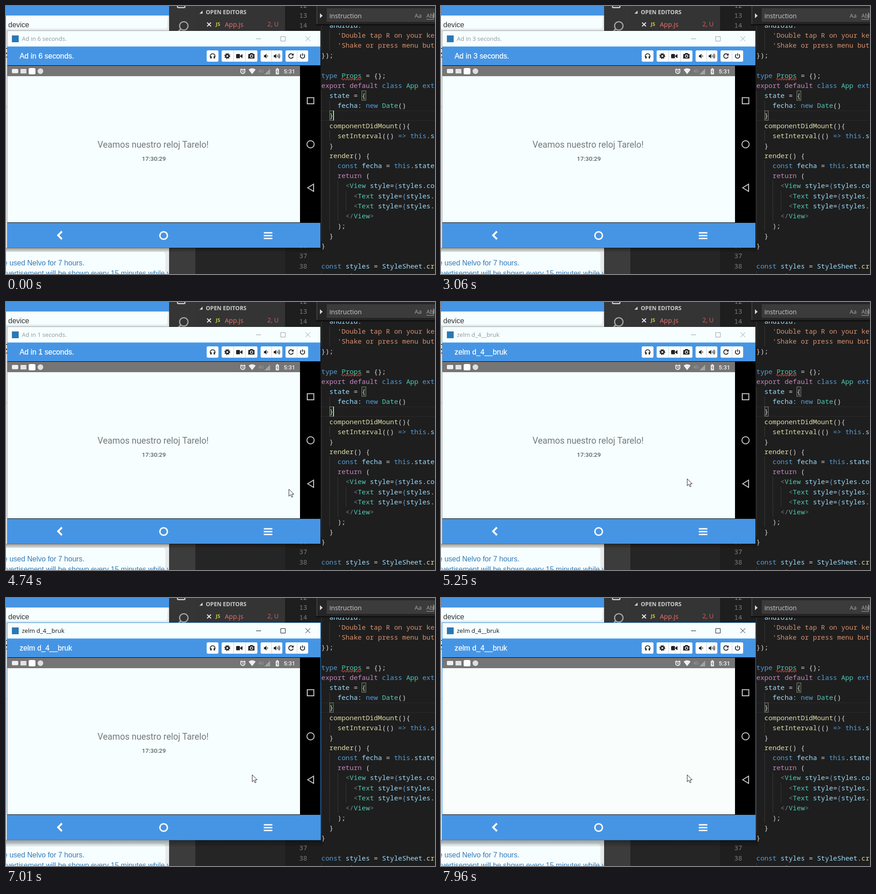
These frames come from a looping animation (947 by 592 pixels, 8000 ms). An HTML page:

```html
<!DOCTYPE html>
<html lang="es">
<head>
<meta charset="utf-8">
<style>
  html, body { margin: 0; width: 100%; height: 100%; overflow: hidden; background: #1e1e1e; }
  svg { display: block; width: 947px; height: 592px; }
  text { white-space: pre; }
  .mono { font: 500 14.88px "Noto Sans Mono", monospace; }
  .ui { font-family: "Open Sans", sans-serif; }
  .web { font: 16px "Liberation Sans", Arial, sans-serif; }
  .droid { font-family: Roboto, sans-serif; }
  #heading { font-size: 16.3px; stroke: #fff; stroke-width: .3px; }
</style>
</head>
<body>
<svg id="stage" viewBox="0 0 947 592" xmlns="http://www.w3.org/2000/svg"></svg>
<script>
const LOOP = 8000;
const BLUE = '#4695e4', PAPER = '#f6feff';
const DEVICE = 'zelm d_4__bruk';

// ---- markup helpers ----
const rect = (x, y, w, h, fill, more = '') =>
  `<rect x="${x}" y="${y}" width="${w}" height="${h}" fill="${fill}" ${more}/>`;
const text = (cls, x, y, str, fill, more = '') =>
  `<text class="${cls}" x="${x}" y="${y}" fill="${fill}" ${more}>${str}</text>`;
const line = (d, stroke, w = 1, more = '') =>
  `<path d="${d}" fill="none" stroke="${stroke}" stroke-width="${w}" ${more}/>`;
const shape = (d, fill, more = '') => `<path d="${d}" fill="${fill}" ${more}/>`;
const disc = (x, y, r, fill, more = '') => `<circle cx="${x}" cy="${y}" r="${r}" fill="${fill}" ${more}/>`;
const esc = s => s.replace(/&/g, '&amp;').replace(/</g, '&lt;').replace(/>/g, '&gt;');

// ---- code editor ----
const COL = 8.93, ROW = 22.15, LEFT = 696;
const baseline = n => 48 + (n - 14) * ROW;
const INK = { k: '#569cd6', p: '#c586c0', t: '#4ec9b0', v: '#9cdcfe', f: '#dcdcaa', s: '#d6906f', w: '#d4d4d4', g: '#808080' };

// Each row: indent, then runs marked ^ plus an ink letter
const code = {
  14: [1, '^vandroid:'],
  15: [2, "^s'Double tap R on your keyboard"],
  16: [2, "^s'Shake or press menu button"],
  17: [0, '^w});'],
  19: [0, '^ktype ^tProps^w = {};'],
  20: [0, '^pexport default ^kclass ^tApp ^kextends'],
  21: [1, '^vstate^w = {'],
  22: [2, '^vfecha: ^knew ^tDate^w()'],
  23: [1, '^w}'],
  24: [1, '^fcomponentDidMount^w(){'],
  25: [2, '^fsetInterval^w(() ^k=> this^w.^vsetState'],
  26: [1, '^w}'],
  27: [1, '^frender^w() {'],
  28: [2, '^kconst ^vfecha^w = ^kthis^w.^vstate'],
  29: [2, '^preturn^w ('],
  30: [3, '^g<^tView ^vstyle^w=^k{^vstyles^w.^vcontainer'],
  31: [4, '^g<^tText ^vstyle^w=^k{^vstyles^w.'],
  32: [4, '^g<^tText ^vstyle^w=^k{^vstyles^w.'],
  33: [3, '^g</^tView^g>'],
  34: [2, '^w);'],
  35: [1, '^w}'],
  36: [0, '^w}'],
  38: [0, '^kconst ^vstyles^w = ^vStyleSheet^w.^fcreate'],
  39: [1, '^vcontainer:^w {'],
};

function codeRow(n, [indent, src]) {
  const runs = src.split('^').slice(1)
    .map(r => `<tspan fill="${INK[r[0]]}">${esc(r.slice(1))}</tspan>`).join('');
  let out = '';
  for (let i = 0; i < indent; i++) {
    const x = Math.round(LEFT + i * 2 * COL) + .5, y = baseline(n) - 16.5;
    out += line(`M${x} ${y}v${ROW}`, '#3a3a3a');
  }
  return out + text('mono', LEFT + indent * 2 * COL, baseline(n), runs, '#d4d4d4');
}

function wave(x, y, n) {
  let d = `M${x} ${y}`;
  for (let i = 0; i < n; i++) d += `q1.5 ${i % 2 ? 3.4 : -3.4} 3 0`;
  return line(d, '#e4473f', 1.2);
}

function editor() {
  let out = rect(616, 0, 331, 592, '#1e1e1e');
  out += line('M690 231.5H947M690 252.5H947', '#2b2b2b');
  out += rect(785.5, 187.5, 9, 21, '#1f2a1f', 'stroke="#888"') + rect(714.5, 231.5, 8, 21, '#1f2a1f', 'stroke="#888"');
  for (const n in code) out += codeRow(+n, code[n]);
  out += wave(740, 162, 15);
  for (const n of [12, 13, 14, 36, 37, 38, 39])
    out += text('mono', 665, baseline(n), n, '#7c7c7c', 'text-anchor="end"');
  return out + rect(722, 231, 2, 22, '#c8c8c6', 'id="caret"');
}

function findBox() {
  return rect(684, 38, 263, 5, '#101010') + rect(685, 0, 262, 40, '#252526') + rect(685, 0, 2.5, 40, '#3a3a3a')
    + shape('M693 16l6 5.5l-6 5.5z', '#d8d8d8')
    + rect(708, 5, 239, 30, '#3b3b3b')
    + text('ui', 714, 27, 'instruction', '#cfcfcf', 'font-size="14.2"')
    + text('ui', 902, 26, 'Aa', '#a8a8a8', 'font-size="13"')
    + text('ui', 928, 26, 'Abl', '#a8a8a8', 'font-size="12.5"')
    + line('M928 29.5H944M943.5 14V30', '#a8a8a8');
}

function sideBars() {
  return rect(360, 0, 58, 592, '#353535') + rect(360, 534, 58, 58, '#3c3c3c')
    + rect(418, 0, 198, 592, '#252526') + rect(418, 0, 198, 55, '#343435')
    + line('M378.5 -4V1.5q0 2 2 2H393q2 0 2 -2V-4', '#d6d6d6', 2.4)
    + line('M386 50.5L380.5 56', '#a5a5a5', 3.2) + disc(392.5, 44, 9.3, 'none', 'stroke="#a5a5a5" stroke-width="2.6"')
    + shape('M434 10v7h-7z', '#d0d0d0')
    + text('ui', 441, 18, 'OPEN EDITORS', '#cccccc', 'font-size="12.4" font-weight="700"')
    + line('M444 36.5l8.5 8.5M452.5 36.5l-8.5 8.5', '#ededed', 2)
    + text('ui', 463, 44, 'JS', '#cbcb41', 'font-size="11" font-weight="700"')
    + text('ui', 483, 46, 'App.js', '#f0706a', 'font-size="14.4"')
    + text('ui', 577, 45, '2, U', '#d0625c', 'font-size="13.8"');
}

function webPage() {
  return rect(0, 0, 360, 592, '#e6eaeb') + rect(0, 0, 360, 21, BLUE)
    + rect(-10, 21, 366, 29, PAPER, 'rx="5"') + rect(0, 21, 357, 10, PAPER)
    + text('web', 5, 47, 'device', '#333')
    + line('M0 222.5h3', '#b5b5b5') + rect(0, 93, 3, 1.5, '#333') + rect(0, 103, 2, 3, '#333') + rect(0, 112, 3, 1.5, '#333')
    + rect(-10, 543, 362, 70, PAPER, 'rx="6"')
    + text('web', -5.7, 573, 'e used Nelvo for 7 hours.', '#337ab7')
    + `<g clip-path="url(#page)">${text('web', 1, 596, 'vertisement will be shown every 15 minutes while you', '#337ab7')}</g>`;
}

// ---- phone mirror window ----
function toolbar() {
  const boxes = [[443, 26], [476, 79], [562, 48], [617, 50]];
  const K = '#222';
  let out = boxes.map(([x, w]) => rect(x, 98, w, 25, '#fcffff', 'rx="3"')).join('');
  out += line('M502.5 98v25M528.5 98v25M586.5 98v25M642.5 98v25', '#c9d3da');
  out += line('M451 113v-2.5a5.2 5.2 0 0 1 10.4 0V113', K, 1.7) + rect(451, 111, 3, 5, K, 'rx="1"') + rect(458.4, 111, 3, 5, K, 'rx="1"');
  out += disc(488.5, 110.5, 3.5, 'none', `stroke="${K}" stroke-width="2.8"`)
    + disc(488.5, 110.5, 5.5, 'none', `stroke="${K}" stroke-width="2" stroke-dasharray="2.16 2.16"`);
  out += rect(508, 106, 8.5, 9.5, K, 'rx="1.5"') + shape('M517 110l5 -4v9.5l-5 -4z', K);
  out += shape('M535 106h3l1.5 -2h5l1.5 2h2.5v10h-14z', K) + disc(542, 110.8, 2.8, K, 'stroke="#fff" stroke-width="1.3"');
  const speaker = x => shape(`M${x} 108.5h2.5l3 -3v10.5l-3 -3h-2.5z`, K);
  out += speaker(569.5) + line('M577 108.5q1.5 2 0 4', K, 1.2);
  out += speaker(591) + line('M598.5 108.5q1.5 2 0 4M600.5 106.5q3 4 0 8M602.5 105q4 5.5 0 11', K, 1.2);
  out += line('M633 107.3a5 5 0 1 0 1 4.5', K, 1.9) + shape('M635 104.5v5h-5z', K);
  out += line('M651.6 106.8a4.8 4.8 0 1 0 6 0M654.6 104.5v5.5', K, 1.8);
  return out;
}

function statusBar() {
  const W = '#efefef';
  return rect(3, 132, 646, 23, '#757575')
    + rect(13, 139, 14, 9.5, W, 'rx="2"') + rect(32, 139, 13, 10, '#e3e3e3', 'rx="1"')
    + rect(50, 137, 15, 14, '#fff', 'rx="3"') + disc(76, 144, 6.2, '#dedede')
    + disc(522.8, 144.5, 4.6, 'none', `stroke="${W}" stroke-width="2"`) + line('M522.8 142v3l2 1M517 141l3 -2.6M528.6 141l-3 -2.6', W, 1.4)
    + shape('M535.5 140.5q7.8 -6 15.6 0l-7.8 10z', W)
    + text('droid', 557, 147, '4G', '#a0a0a0', 'font-size="9.5"')
    + shape('M583 138.5v12.5h-12.5z', '#a3a3a3')
    + rect(595.5, 139, 7, 12, W, 'rx="1"') + rect(597.3, 137.5, 3.4, 2, W) + line('M599.5 141l-1.5 4h2.2l-1.3 4', '#757575', 1.1)
    + text('droid', 613, 149, '5:31', W, 'font-size="12.9" font-weight="500"');
}

function phone() {
  const N = '#c9c9c9';
  return rect(3, 131, 691, 348, '#000') + statusBar()
    + rect(3, 155, 646, 323, PAPER, 'id="screen"')
    + '<g id="app">'
    + text('droid', 202, 313.3, 'Veamos nuestro reloj Tarelo!', '#767a7a', 'font-size="19.35"')
    + text('droid', 300, 342.3, '17:30:29', '#606464', 'font-size="13.4" font-weight="500"')
    + '</g><g id="loading">' + rect(3, 155, 646, 26, '#006200')
    + text('droid', 326, 173, 'Loading from localhost:8081...', '#e9f3e9', 'font-size="11.7" text-anchor="middle"')
    + '</g>'
    + line('M665 202.5h14.5v13.5h-14.5zM679 393.5v16l-13 -8z', N, 2)
    + disc(672.3, 305.5, 8, 'none', `stroke="${N}" stroke-width="2"`);
}

function mirror() {
  return rect(0, 534, 700, 9, 'url(#fall)', 'id="shade"')
    + rect(3, 55, 691, 479, PAPER) + rect(2.5, 54.5, 692, 480, 'none', 'id="frame"')
    + rect(13, 65, 15, 15, '#2b78b4')
    + text('ui', 35, 77, '', '#999', 'id="title" font-size="13.1"')
    + '<g id="buttons" fill="none" stroke="#999"><path d="M552 72.5h11M606.5 67.5h10v10h-10zM661 67l10.5 10.5M671.5 67l-10.5 10.5"/></g>'
    + rect(3, 89.5, 691, 42, BLUE) + text('web', 30, 115.5, '', '#fff', 'id="heading"')
    + toolbar() + phone()
    + rect(3, 479, 691, 55, BLUE)
    + line('M123.5 498l-8.5 8.5l8.5 8.5', '#fff', 4)
    + disc(348, 507, 8.3, 'none', 'stroke="#fff" stroke-width="3"')
    + line('M569 501h19M569 507.2h19M569 513.4h19', '#fff', 3);
}

const stage = document.getElementById('stage');
stage.innerHTML = `<defs>
  <clipPath id="page"><rect width="360" height="592"/></clipPath>
  <linearGradient id="fall" x2="0" y2="1">
    <stop offset="0" stop-opacity=".34"/><stop offset="1" stop-opacity=".05"/>
  </linearGradient></defs>`
  + editor() + findBox() + sideBars() + webPage() + mirror()
  + shape('M0 0V15.5l3.6 -3.4l2.4 5.6l2.5 -1.1l-2.4 -5.4h5z', '#fff', 'id="mouse" stroke="#222" stroke-width="1"');

// ---- timeline ----
const blinks = [120, 550, 1140, 1570, 2130, 2530, 3060, 3610, 4110, 4620, 5130, 5520, 6050, 6480, 7010, 7560, 7960];
const counts = [270, 1290, 2250, 3210, 4260];
const AD_END = 5250, FOCUS = 5370, RELOAD = 7130, BLANK = 7960;
// time, x, y of the pointer; it jumps from point to point
const trail = [[4380, 806, 524], [4500, 742, 482], [4620, 676, 440], [4740, 624.5, 413.5], [4860, 584, 399], [5010, 553, 392], [5130, 543.5, 390.5]];

const $ = id => document.getElementById(id);
const set = (id, attrs) => { for (const a in attrs) $(id).setAttribute(a, attrs[a]); };
const show = (id, on) => set(id, { visibility: on ? 'visible' : 'hidden' });
const passed = (list, t) => list.filter(x => x <= t).length;

function draw(t) {
  const label = t < AD_END ? `Ad in ${6 - passed(counts, t)} seconds.` : DEVICE;
  $('title').textContent = $('heading').textContent = label;

  const active = t >= FOCUS;
  set('title', { fill: active ? '#111' : '#929696' });
  set('buttons', { stroke: active ? '#111' : '#979b9b' });
  set('frame', { stroke: active ? '#2a86d6' : 'rgba(0,0,0,.35)' });
  set('shade', { height: active ? 15 : 9 });

  show('caret', passed(blinks, t) % 2 === 0);
  show('loading', t >= RELOAD && t < BLANK);
  show('app', t < BLANK);
  set('screen', { fill: t < BLANK ? PAPER : '#f9fdfb' });

  const spot = trail.filter(p => p[0] <= t).pop();
  show('mouse', spot);
  if (spot) set('mouse', { transform: `translate(${spot[1]} ${spot[2]})` });
}

function tick() {
  draw(performance.now() % LOOP);
  requestAnimationFrame(tick);
}
tick();
</script>
</body>
</html>
```
